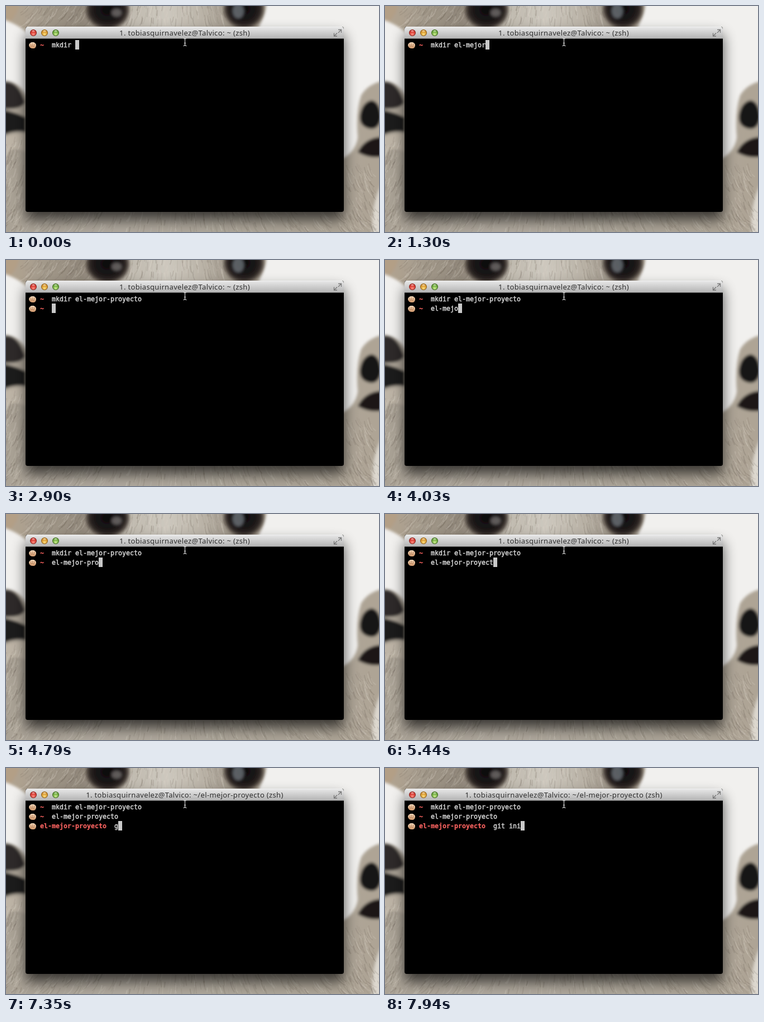
These frames come from a looping animation (668 by 405 pixels, 8 s). An HTML page:

```html
<!DOCTYPE html>
<html lang="es">
<head>
<meta charset="utf-8">
<title>Terminal</title>
<style>
  html, body { margin: 0; width: 100%; height: 100%; overflow: hidden; background: #f1f0ee; }
  svg { display: block; width: 668px; height: 405px; }
  text { white-space: pre; }
  .title { font: 13px "Noto Sans", "Open Sans", sans-serif; letter-spacing: .35px; fill: #2e2e2e; text-anchor: middle; }
  .term { font: 11.63px "DejaVu Sans Mono", "Noto Sans Mono", monospace; fill: #d8d8d8; stroke: #d8d8d8; stroke-width: .45px; }
  .prompt { font-weight: 700; fill: #ff6562; stroke: #ff6562; stroke-width: .15px; }
</style>
</head>
<body>
<svg viewBox="0 0 668 405" xmlns="http://www.w3.org/2000/svg">
  <defs>
    <linearGradient id="bar" x2="0" y2="1">
      <stop stop-color="#e9e9e9"/><stop offset="1" stop-color="#b1b1b1"/>
    </linearGradient>
    <linearGradient id="face">
      <stop stop-color="#b3a48f"/><stop offset=".12" stop-color="#a89e8f"/>
      <stop offset=".3" stop-color="#91887b"/><stop offset=".48" stop-color="#bfb9ae"/>
      <stop offset=".62" stop-color="#cdc8be"/><stop offset=".76" stop-color="#b9b2a6"/>
      <stop offset=".9" stop-color="#938a7e"/><stop offset="1" stop-color="#aaa194"/>
    </linearGradient>
    <linearGradient id="body">
      <stop stop-color="#aaa295"/><stop offset=".3" stop-color="#b0a99e"/>
      <stop offset=".7" stop-color="#aca598"/><stop offset="1" stop-color="#aea495"/>
    </linearGradient>
    <radialGradient id="eye">
      <stop stop-color="#0c0b0c"/><stop offset=".6" stop-color="#1b1718"/>
      <stop offset=".82" stop-color="#2e2724"/><stop offset="1" stop-color="#4f443b" stop-opacity=".5"/>
    </radialGradient>
    <linearGradient id="skin" x2="0" y2="1">
      <stop stop-color="#fbe3c6"/><stop offset="1" stop-color="#cf9669"/>
    </linearGradient>
    <radialGradient id="red" cy=".75"><stop stop-color="#ff8d80"/><stop offset="1" stop-color="#d2342c"/></radialGradient>
    <radialGradient id="amber" cy=".75"><stop stop-color="#ffe07c"/><stop offset="1" stop-color="#d4922a"/></radialGradient>
    <radialGradient id="green" cy=".75"><stop stop-color="#cdf08e"/><stop offset="1" stop-color="#66a338"/></radialGradient>
    <filter id="soft" x="-30%" y="-30%" width="160%" height="160%"><feGaussianBlur stdDeviation="2.500"/></filter>
    <filter id="shade" x="-10%" y="-20%" width="120%" height="140%"><feGaussianBlur stdDeviation="12"/></filter>
    <g id="fist">
      <path d="M41 70q1-4 5-5h3.500q3.500 1 4.500 4.500 0 5-3.500 6.500h-4q-5-1-5.500-6z" fill="url(#skin)"/>
      <path d="M44.500 67v4M47.500 66.500v4M50.500 67v4M43 72.500q4-2 8 0" fill="none" stroke="#a86f48" stroke-width=".8"/>
    </g>
  </defs>

  <rect width="668" height="405" fill="#f1f0ee"/>
  <g filter="url(#soft)">
    <path d="M-5-5H467Q463 22 446 50H40Q24 34-5 24Z" fill="url(#face)"/>
    <path d="M-5-5H24Q20 16 8 27L-5 24Z" fill="#b39f86"/>
    <path d="M-5 134Q26 134 40 168V275H600Q626 262 630 236 626 190 636 160 648 140 675 134V410H-5Z" fill="url(#body)"/>
    <path d="M-5 136Q22 132 34 172 30 186-5 184Z" fill="#2f2c2a"/>
    <path d="M-5 186Q22 192 36 200V226Q14 222-5 232Z" fill="#1d1b1b"/>
    <path d="M-5 236Q20 226 36 230V262Q16 250-5 264Z" fill="#bdb4a6"/>
    <path d="M655 169Q670 172 672 200 668 222 652 220 632 216 634 196 638 172 655 169Z" fill="#151415"/>
    <path d="M630 262Q642 236 675 234V270Q650 274 630 262Z" fill="#1b1919"/>
    <path d="M675 315Q654 350 656 410H675Z" fill="#dcd7ce"/>
  </g>
  <g id="fur" fill="none"></g>
  <g filter="url(#soft)">
    <ellipse cx="182" cy="7" rx="40" ry="35" fill="url(#eye)"/>
    <ellipse cx="426" cy="5" rx="37" ry="36" fill="url(#eye)"/>
    <ellipse cx="198" cy="12" rx="9" ry="7" fill="#908b88" opacity=".6"/>
    <ellipse cx="416" cy="9" rx="10" ry="13" fill="#8b929b" opacity=".6"/>
  </g>

  <rect x="35" y="51" width="570" height="332" rx="6" opacity=".68" filter="url(#shade)"/>
  <rect x="35" y="37" width="570" height="332" rx="4"/>
  <path d="M35 59V42q0-5 5-5H600q5 0 5 5V59Z" fill="url(#bar)"/>
  <path d="M38 37.500H602" stroke="#f0f0f0"/>
  <path d="M35 58.500H605" stroke="#555"/>
  <g stroke-width="1.100">
    <circle cx="49" cy="48" r="5.500" fill="url(#red)" stroke="#8a2f2a"/>
    <circle cx="69" cy="48" r="5.500" fill="url(#amber)" stroke="#8f6524"/>
    <circle cx="89" cy="48" r="5.500" fill="url(#green)" stroke="#4a6f2c"/>
  </g>
  <path d="M46 45.500q3-3.500 6 0zM66 45.500q3-3.500 6 0zM86 45.500q3-3.500 6 0z" fill="#fff" opacity=".75"/>
  <path d="M595 42.500H600.500V48M587.500 48.500V54H593M600 43 595 48M588 53.500 593 48.500" fill="none" stroke="#777" stroke-width="1.300"/>
  <text id="title" class="title" x="320" y="53"></text>
  <g id="rows"></g>
  <rect id="caret" width="7" height="17" fill="#c9c9c9"/>
  <path d="M317.500 57.500q3 0 3 2.500 0-2.500 3-2.500M320.500 60V69M317.500 71.500q3 0 3-2.500 0 2.500 3 2.500M319 66.500h3" fill="none" stroke="#dedede" stroke-width="1.100"/>
</svg>
<script>
const LOOP = 8000, LEFT = 40, TOP = 61, CELL = 7, LINE = 17;
const $ = id => document.getElementById(id);

function add(parent, tag, attrs) {
  const el = document.createElementNS('http://www.w3.org/2000/svg', tag);
  for (const key in attrs) el.setAttribute(key, attrs[key]);
  return parent.appendChild(el);
}

// Evenly spaced keystrokes from one time to another.
const burst = (from, to, n) =>
  Array.from({ length: n }, (_, i) => from + (to - from) * i / (n - 1));

const project = 'el-mejor-proyecto';
const user = '1. tobiasquirnavelez@Talvico: ~';
const lines = [
  { start: 0, prompt: '~', given: 'mkdir ', typed: project,
    keys: [180, 480, 720, ...burst(950, 1300, 5), 1540, ...burst(1780, 1960, 3),
           ...burst(2200, 2380, 3), 2490, 2610] },
  { start: 2840, prompt: '~', given: '', typed: project,
    keys: [3080, 3140, 3620, 3800, 3920, 4030, 4030, 4200, 4380,
           ...burst(4560, 4790, 3), ...burst(5030, 5200, 3), 5440, 5560] },
  { start: 5700, prompt: project, given: '', typed: 'git ini',
    keys: [...burst(7350, 7700, 5), 7880, 7940] },
];
const titles = [
  [0, user], [2780, '1. mkdir ' + project], [2900, user],
  [5620, '1. ' + project], [5790, user + '/' + project],
];

lines.forEach((line, i) => {
  const y = TOP + 13 + i * LINE;
  line.group = add($('rows'), 'g', {});
  add(line.group, 'use', { href: '#fist', y: i * LINE });
  add(line.group, 'text', { class: 'term prompt', x: LEFT + 3 * CELL, y }).textContent = line.prompt;
  line.column = 5 + line.prompt.length;
  line.text = add(line.group, 'text', { class: 'term', x: LEFT + line.column * CELL, y });
});

function drawFur() {
  let seed = 11;
  const rand = () => (seed = seed * 16807 % 2147483647) / 2147483647;
  const tuft = (x, y, w, h, count, lean) => {
    for (let i = 0; i < count; i++) {
      const px = x + rand() * w, py = y + rand() * h, len = 8 + rand() * 14;
      const dx = lean(px) * len + (rand() - .5) * 6;
      add($('fur'), 'path', {
        d: `M${px} ${py}q${dx * .2} ${len * .6} ${dx} ${len}`,
        stroke: rand() < .5 ? '#e6e0d5' : '#6f655a',
        'stroke-width': 1 + rand() * 1.5, opacity: .08 + rand() * .16,
      });
    }
  };
  const outward = x => (x - 310) / 300;
  tuft(40, -12, 400, 36, 260, outward);
  tuft(0, 232, 32, 165, 100, () => -.4);
  tuft(0, 362, 668, 36, 260, outward);
  tuft(608, 280, 50, 115, 90, () => .5);
}

function draw(t) {
  let row = 0, column = 0;
  lines.forEach((line, i) => {
    const shown = t >= line.start;
    line.group.setAttribute('visibility', shown ? 'visible' : 'hidden');
    if (!shown) return;
    const count = line.keys.filter(time => time <= t).length;
    line.text.textContent = line.given + line.typed.slice(0, count);
    row = i;
    column = line.column + line.given.length + count;
  });
  const running = t >= 2780 && t < 2840;
  if (t >= 5620 && t < 5700) { row = 2; column = 0; }
  $('caret').setAttribute('visibility', running ? 'hidden' : 'visible');
  $('caret').setAttribute('x', LEFT + column * CELL);
  $('caret').setAttribute('y', TOP + row * LINE);
  $('title').textContent = titles.filter(([time]) => time <= t).pop()[1] + ' (zsh)';
}

drawFur();
draw(0);
const begin = performance.now();
(function tick() {
  draw((performance.now() - begin) % LOOP);
  requestAnimationFrame(tick);
})();
</script>
</body>
</html>
```
